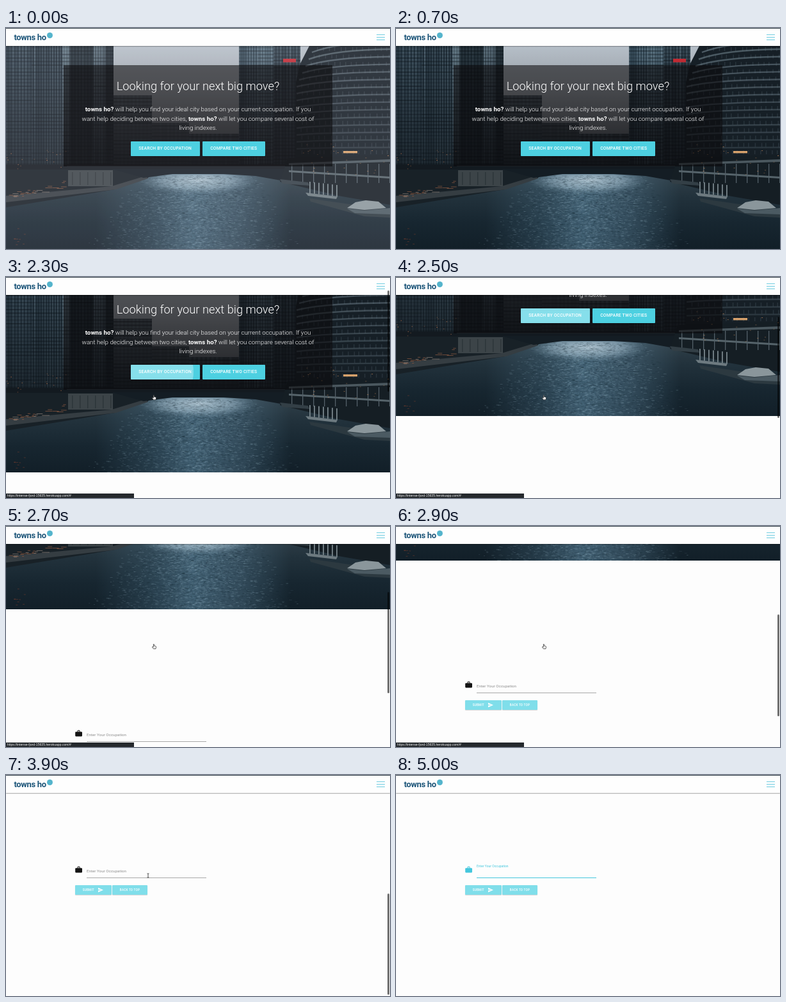
Write an HTML page with a canvas that moves like this. It is 600 px wide and 345 px high and loops after 5100 ms.

```html
<!DOCTYPE html>
<html lang="en">
<head>
<meta charset="utf-8">
<title>towns ho?</title>
<style>
  html, body { margin: 0; width: 100%; height: 100%; overflow: hidden; background: #fdfdfd; }
  #stage { position: relative; width: 600px; height: 345px; overflow: hidden; background: #fdfdfd; font-family: Roboto, sans-serif; }
  #stage * { box-sizing: border-box; }
  #page, #photo, #haze, #panel, .line, .btn, .abs { position: absolute; }
  #page { left: 0; top: 0; width: 600px; height: 736px; will-change: transform; }
  #photo, #haze { left: 0; top: 0; width: 600px; height: 345px; }
  #haze { background: #1e1c1e; mix-blend-mode: screen; }
  #panel { left: 90px; top: 58px; width: 420px; height: 158px; background: rgba(10, 8, 9, .56); }
  .line { left: 0; width: 600px; text-align: center; white-space: nowrap; color: #fff; font-weight: 300; }
  .line b { font-weight: 700; }
  h1 { margin: 0; top: 78.8px; font-size: 18.3px; line-height: 24px; }
  p { margin: 0; top: 119.6px; font-size: 9.78px; line-height: 14.9px; }
  .btn { overflow: hidden; border-radius: 1px; background: #4dd0e1; color: #fff; text-align: center; white-space: nowrap;
         font-size: 6.75px; font-weight: 500; letter-spacing: .22px; box-shadow: 0 .8px 1px rgba(0, 0, 0, .2); }
  .big { top: 177px; height: 22.6px; line-height: 22.6px; }
  .small { top: 563px; height: 15px; line-height: 15px; background: #80deea; font-size: 4.65px; }
  .btn span { position: relative; }
  #ripple { position: absolute; border-radius: 50%; background: rgba(255, 255, 255, .32); }
  #label { left: 126px; top: 536px; font-size: 6.25px; line-height: 10px; color: #9e9e9e; white-space: nowrap; transform-origin: 0 0; }
  #field { left: 126px; top: 551px; width: 186.5px; height: 1px; background: #a8a8a8; }
  #nav { left: 0; top: 0; width: 600px; height: 27.5px; background: #fefefe; border-top: 1px solid #36424b;
         box-shadow: 0 .8px 1.2px rgba(0, 0, 0, .35); }
  #brand { left: 12.5px; top: 5.5px; font-size: 13px; line-height: 16px; font-weight: 700; letter-spacing: -.35px; color: #1b5478; white-space: nowrap; }
  #dot { left: 63.8px; top: 6px; width: 9.4px; height: 9.4px; border-radius: 50%; background: #54b4cc; }
  .bar { left: 579px; width: 13px; height: 1.3px; background: #70cce0; }
  #thumb { left: 596px; width: 3.4px; height: 158.5px; border-radius: 2px; background: rgba(0, 0, 0, .56); }
  #status { left: 0; top: 337.5px; width: 200px; height: 7.5px; padding-left: 1.8px; background: #25292d; color: #f4f4f4;
            font: 5.1px/7.5px "Liberation Sans", Arial, sans-serif; white-space: nowrap; }
  #cursor { left: 0; top: 0; overflow: visible; }
</style>
</head>
<body>
<div id="stage">
  <div id="page">
    <canvas id="photo" width="600" height="345"></canvas>
    <div id="haze"></div>
    <div id="panel"></div>
    <h1 class="line">Looking for your next big move?</h1>
    <p class="line"><b>towns ho?</b> will help you find your ideal city based on your current occupation. If you<br>want help deciding between two cities, <b>towns ho?</b> will let you compare several cost of<br>living indexes.</p>
    <div class="btn big" style="left:194.5px;width:108.3px"><i id="ripple"></i><span>SEARCH BY OCCUPATION</span></div>
    <div class="btn big" style="left:306.5px;width:98.5px"><span>COMPARE TWO CITIES</span></div>
    <svg class="abs" style="left:108px;top:533px" width="12" height="12" viewBox="0 0 12 12">
      <path id="bag" fill-rule="evenodd" d="M1 3.2h2.6V1.6l.8-.8h2.4l.8.8v1.6h2.6l.8.8v5.6l-.8.8H1l-.8-.8V4zM4.6 3.2h2V1.8h-2z"/>
    </svg>
    <div id="label" class="abs">Enter Your Occupation</div>
    <div id="field" class="abs"></div>
    <div class="btn small" style="left:107.5px;width:57px;text-align:left;padding-left:12.2px"><span>SUBMIT</span>
      <svg class="abs" style="left:36.5px;top:4px" width="8" height="7" viewBox="0 0 8 7"><path fill="#fff" d="M0 0l8 3.5L0 7V4.3l5.6-.8L0 2.7z"/></svg>
    </div>
    <div class="btn small" style="left:165.7px;width:55.6px"><span>BACK TO TOP</span></div>
  </div>
  <div id="nav" class="abs">
    <div id="brand" class="abs">towns ho</div>
    <div id="dot" class="abs"></div>
    <div class="bar abs" style="top:9px"></div>
    <div class="bar abs" style="top:13px"></div>
    <div class="bar abs" style="top:17px"></div>
  </div>
  <div id="status" class="abs">https://intense-fjord-15635.herokuapp.com/#</div>
  <div id="thumb" class="abs"></div>
  <svg id="cursor" class="abs" width="1" height="1">
    <path id="arrow" fill="#111" stroke="#fff" stroke-width=".6" d="M0 0v7l1.7-1.5 1.1 2.5 1.1-.5-1.1-2.4h2.3z"/>
    <path id="hand" fill="#fff" stroke="#222" stroke-width=".7" stroke-linejoin="round" d="M-.7-3.3q.6-.7 1.1 0v2.3l2.6.6q.7.3.5 1.2L3 3.7H-.6L-2.6.9q.2-.8 1-.4l.9.6z"/>
    <path id="beam" fill="none" stroke="#222" stroke-width=".8" d="M-1.4-3.3Q0-3.3 0-2.5V2.5Q0 3.3-1.4 3.3M1.4-3.3Q0-3.3 0-2.5M0 2.5Q0 3.3 1.4 3.3"/>
  </svg>
</div>
<script>
const $ = id => document.getElementById(id);
const LOOP = 5100, TICK = 100;

function paintPhoto() {
  const c = $('photo').getContext('2d');
  let seed = 7;
  const rnd = () => (seed = seed * 16807 % 2147483647) / 2147483647;
  const rect = (col, x, y, w, h) => { c.fillStyle = col; c.fillRect(x, y, w, h); };
  const poly = (col, ...p) => {
    c.fillStyle = col;
    c.beginPath();
    for (let i = 0; i < p.length; i += 2) c.lineTo(p[i], p[i + 1]);
    c.fill();
  };
  const ramp = (x1, y1, x2, y2, ...cols) => {
    const g = c.createLinearGradient(x1, y1, x2, y2);
    cols.forEach((col, i) => g.addColorStop(i / (cols.length - 1), col));
    return g;
  };
  const fade = (y1, y2, ...cols) => ramp(0, y1, 0, y2, ...cols);
  // facade of uneven upright strips crossed by floor lines
  const tower = (x, w, col, top = 20, strip = 4, glass = .2) => {
    rect(fade(20, 225, col, '#161f26'), x, top, w, 216 - top);
    for (let i = x; i < x + w - 1; i += strip)
      rect(fade(top, 215, `rgba(140,166,182,${rnd() * glass * 2})`, `rgba(80,100,112,${rnd() * glass})`), i, top, strip * .5, 215 - top);
    for (let y = top + 4; y < 212; y += 5.5) rect(`rgba(8,14,19,${.15 + rnd() * .3})`, x, y, w, 1.8);
  };

  // skyline
  rect(fade(27, 216, '#b6bfc8', '#9aa1a8', '#666c72', '#2c353c'), 0, 0, 600, 225);
  tower(0, 40, '#273743', 20, 5);
  tower(40, 48, '#22313c', 20, 4, .25);
  tower(88, 11, '#566a76', 20, 4, .2);
  tower(99, 38, '#1d2931', 20, 5, .12);
  tower(137, 19, '#44545f', 20, 4);
  tower(156, 12, '#222e36', 20, 4, .1);
  tower(168, 60, '#636e76', 105, 6, .06);
  tower(228, 58, '#6b7379', 148, 6, .05);
  tower(286, 80, '#5a646b', 165, 7, .06);
  tower(364, 30, '#344957', 20, 4, .28);
  tower(394, 24, '#455c6a', 20, 4, .25);
  tower(418, 42, '#263641', 24, 5, .2);
  rect('#c02a33', 433, 48, 20, 5.5);

  // round tower with arched decks
  poly('#161f26', 478, 20, 600, 20, 600, 225, 452, 225, 453, 85, 460, 55);
  for (let i = 0; i < 15; i++) {
    const y = 26 + i * 11.5, bend = 12 - i * .75, left = Math.max(454, 478 - i * 5);
    c.lineWidth = 2.4;
    c.strokeStyle = `rgba(112,130,141,${.62 - i * .026})`;
    c.beginPath();
    c.moveTo(left, y + bend);
    c.quadraticCurveTo(left + 40, y - bend * .3, 600, y - bend * .4);
    c.stroke();
    for (let x = left + 6; x < 600; x += 9) rect('rgba(112,132,144,.2)', x + rnd() * 3, y + 4, 1.5, 6);
  }

  // river
  rect(fade(222, 345, '#35444d', '#22323c', '#172630', '#121f28'), 0, 222, 600, 123);
  rect(ramp(140, 0, 445, 0, 'rgba(72,108,130,0)', 'rgba(72,108,130,.32)', 'rgba(86,124,147,.68)', 'rgba(80,114,136,.48)', 'rgba(72,108,130,0)'), 140, 228, 305, 117);
  c.save();
  c.translate(300, 238);
  c.scale(1, .24);
  const glow = c.createRadialGradient(0, 0, 5, 0, 0, 95);
  glow.addColorStop(0, 'rgba(184,204,216,.85)');
  glow.addColorStop(.55, 'rgba(150,176,192,.62)');
  glow.addColorStop(1, 'rgba(100,130,148,0)');
  c.fillStyle = glow;
  c.fillRect(-100, -40, 200, 150);
  c.restore();
  for (let i = 0; i < 4200; i++) {
    const y = 230 + rnd() * 115;
    const x = 298 + (rnd() + rnd() - 1) * (95 + (y - 230) * .75);
    c.fillStyle = rnd() > .5 ? `rgba(162,192,208,${.08 + .2 * rnd()})` : 'rgba(16,32,42,.22)';
    c.fillRect(x, y, 1.5 + rnd() * 3.5, .8);
  }

  // banks and bridge
  poly('#182127', 0, 214, 232, 222, 222, 234, 170, 252, 0, 280);
  poly('#353d42', 0, 262, 165, 247, 218, 231, 222, 235, 172, 252, 0, 272);
  rect('#3c4448', 97, 222, 70, 25);
  for (let x = 103; x < 165; x += 12) rect('#2c3539', x, 225, 1.5, 20);
  rect('#131a20', 0, 213, 460, 8);
  poly('#141d24', 165, 220, 452, 220, 452, 242, 390, 231, 340, 228, 260, 228, 215, 234);
  rect('rgba(105,120,128,.45)', 95, 215, 360, .8);
  for (let i = 0; i < 26; i++) {
    const x = rnd() * 92;
    rect(rnd() > .4 ? '#8f5a41' : '#8d8078', x, 238 + rnd() * 10 + (92 - x) * .22, 3 + rnd() * 9, .7);
  }
  for (let i = 0; i < 18; i++) rect(`rgba(205,130,85,${.3 + rnd() * .5})`, rnd() * 95, 190 + rnd() * 42, 1.5, 1);
  for (let i = 0; i < 9; i++) rect('rgba(165,75,48,.45)', 12 + rnd() * 16, 312 + rnd() * 26, 3, .8);

  // riverside terrace and boats
  poly('#151e24', 440, 203, 600, 198, 600, 276, 520, 262, 470, 250, 428, 240);
  poly('#4b585f', 442, 211, 600, 205, 600, 209, 442, 214);
  poly('#56646b', 442, 222, 600, 232, 600, 235, 442, 225);
  for (let x = 446; x < 600; x += 17) rect('#536068', x, 212, 1.3, 30);
  for (let i = 0; i < 28; i++) rect(`rgba(214,150,100,${.3 + rnd() * .5})`, 462 + rnd() * 138, 180 + rnd() * 50, 2, 1);
  rect('#d8a26c', 527, 192, 22, 3.4);
  poly('#333f46', 428, 236, 472, 241, 474, 246, 432, 243);
  for (let x = 474; x < 520; x += 7) rect('#78858b', x, 240 + (x - 474) * .12, 1.8, 18);
  poly('#6d7a80', 468, 257, 518, 263, 516, 267, 472, 262);
  poly('#2c3940', 474, 266, 600, 284, 600, 296, 560, 294, 476, 271);
  poly('#8a969b', 533, 281, 546, 272, 562, 269, 582, 271, 594, 281, 560, 284);
  poly('#4b5a62', 533, 282, 560, 285, 600, 281, 600, 291, 545, 289);
}

// linear interpolation through [time, value] steps
function track(t, steps) {
  let [t0, v0] = steps[0];
  for (const [t1, v1] of steps) {
    if (t < t1) return t1 === t0 ? v0 : v0 + (v1 - v0) * Math.max(0, t - t0) / (t1 - t0);
    [t0, v0] = [t1, v1];
  }
  return v0;
}

const SCROLL = [[2100, 0], [2200, 12], [2300, 40], [2400, 82], [2500, 128], [2700, 215],
                [2900, 291], [3100, 346], [3300, 380], [3500, 391]];
const MOUSE_X = [[900, 262], [1400, 231], [3600, 231], [3800, 222]];
const MOUSE_Y = [[900, 238], [1400, 188], [3600, 188], [3800, 157]];
const RIPPLE = [[2000, 0], [2300, 62], [2500, 92]];
const FOCUS = [[4500, 0], [4700, 1]];
const THUMB = [[4200, 1], [4500, 0]];
const HAZE = [[0, 1], [700, 0]];

const show = (el, on) => { el.style.visibility = on ? 'visible' : 'hidden'; };
const mix = (a, b, k) => `rgb(${a.map((v, i) => Math.round(v + (b[i] - v) * k))})`;

function draw(t) {
  const y = track(t, SCROLL);
  $('page').style.transform = `translateY(${-y}px)`;
  $('haze').style.opacity = track(t, HAZE);

  const thumb = $('thumb');
  thumb.style.top = 2 + y * .468 + 'px';
  thumb.style.opacity = t < 2200 ? 0 : track(t, THUMB);

  const r = track(t, RIPPLE);
  $('ripple').style.cssText = `left:${36 - r}px;top:${11 - r}px;width:${2 * r}px;height:${2 * r}px`;

  show($('status'), t >= 1400 && t < 3700);

  const my = track(t, MOUSE_Y);
  $('cursor').style.transform = `translate(${track(t, MOUSE_X)}px,${my}px)`;
  const on = t >= 900 && t < 4600;
  const shape = t >= 3800 ? 'beam' : t >= 3700 || my > 200 ? 'arrow' : 'hand';
  for (const id of ['arrow', 'hand', 'beam']) show($(id), on && id === shape);

  const k = track(t, FOCUS), cyan = [68, 199, 221];
  $('label').style.transform = `translateY(${-6.7 * k}px) scale(${1 - .2 * k})`;
  $('label').style.color = mix([142, 142, 142], cyan, k);
  $('field').style.background = mix([168, 168, 168], cyan, k);
  $('bag').style.fill = mix([20, 20, 20], cyan, k);
}

function loop(now) {
  draw(Math.floor(now % LOOP / TICK) * TICK);
  requestAnimationFrame(loop);
}

paintPhoto();
draw(0);
requestAnimationFrame(loop);
</script>
</body>
</html>
```
